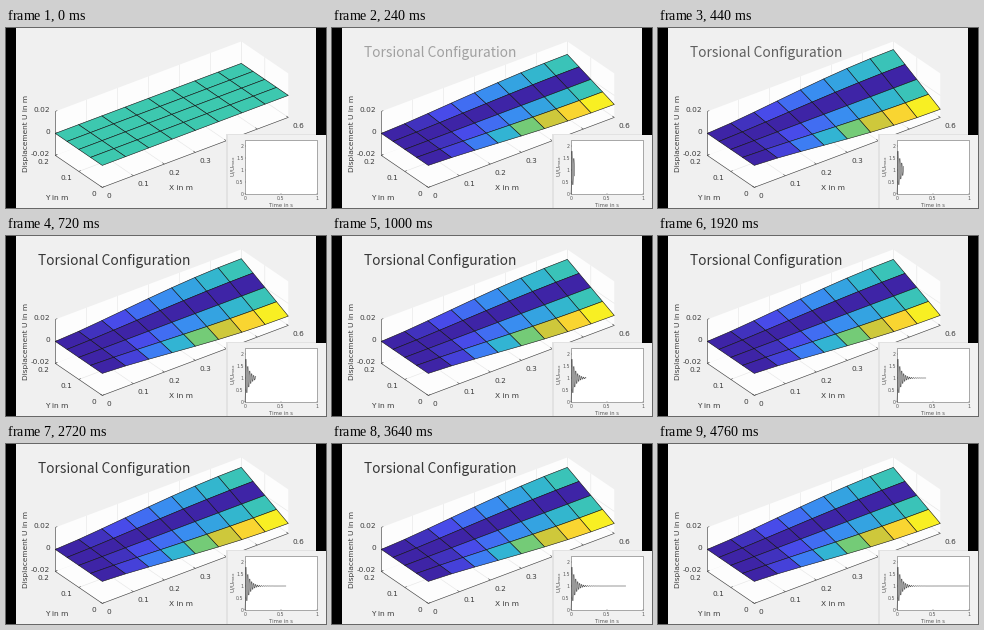
These frames come from a looping animation (320 by 180 pixels, 4.8 s). A matplotlib script:

```python
import numpy as np
import matplotlib.pyplot as plt
from matplotlib.animation import FuncAnimation
from matplotlib.collections import LineCollection, PolyCollection
from matplotlib.colors import LinearSegmentedColormap
from matplotlib.patches import Polygon, Rectangle

W, H, DPI = 320, 180, 100
FRAMES, INTERVAL = 120, 40
PT = 72 / DPI
NX, NY = 8, 4
INK = "#3c3c3c"
PALE_INK = "#5a5a5a"
GREY = "#f0f0f0"
GRID = "#e6e6e6"

# Oblique projection: pixel vectors of the three axes
ORIGIN = np.array([96.3, 137.4])
X_VEC = np.array([186, -70])
Y_VEC = np.array([-47, -32])
Z_VEC = np.array([0, -22])
TWIST = 12 / 22

FREQ, DECAY = 36.8, 18
FADE = 14

cmap = LinearSegmentedColormap.from_list("surface", [
    (0, (0.242, 0.140, 0.650)), (1 / 7, (0.285, 0.310, 0.940)),
    (2 / 7, (0.230, 0.530, 0.955)), (3 / 7, (0.190, 0.690, 0.850)),
    (1 / 2, (0.235, 0.784, 0.690)), (4 / 7, (0.350, 0.800, 0.570)),
    (5 / 7, (0.690, 0.785, 0.240)), (6 / 7, (0.980, 0.780, 0.220)),
    (1, (0.970, 0.970, 0.120))])

plt.rcParams["font.family"] = "DejaVu Sans"
fig = plt.figure(figsize=(W / DPI, H / DPI), dpi=DPI, facecolor=GREY)
ax = fig.add_axes([0, 0, 1, 1])
ax.set_xlim(0, W)
ax.set_ylim(H, 0)
ax.axis("off")


def project(x, y, z):
    """Map x, y in 0..1 and z in -1..1 to stage pixels."""
    return ORIGIN + x * X_VEC + y * Y_VEC + z * Z_VEC


def box(x, y, w, h, color, z):
    ax.add_patch(Rectangle((x, y), w, h, fc=color, ec="none", zorder=z))


def lines(segments, color, px, z):
    ax.add_collection(LineCollection(segments, colors=color,
                                     linewidths=px * PT, zorder=z))


def label(x, y, text, px, z=6, ha="center", color=INK, **kw):
    return ax.text(x, y, text, fontsize=px * PT, ha=ha,
                   va=kw.pop("va", "center_baseline"), color=color,
                   zorder=z, **kw)


def draw_box():
    walls = [
        [(0, 1, -1), (1, 1, -1), (1, 1, 1), (0, 1, 1)],
        [(1, 0, -1), (1, 1, -1), (1, 1, 1), (1, 0, 1)],
        [(0, 0, -1), (1, 0, -1), (1, 1, -1), (0, 1, -1)],
    ]
    for wall in walls:
        ax.add_patch(Polygon([project(*p) for p in wall], fc="#fdfdfd",
                             ec="none", zorder=1))
    grid = []
    for x in np.arange(1, 7) / 6:
        grid.append([project(x, 0, -1), project(x, 1, -1), project(x, 1, 1)])
    grid.append([project(0, 0.5, -1), project(1, 0.5, -1),
                 project(1, 0.5, 1)])
    grid.append([project(0, 1, 0), project(1, 1, 0), project(1, 0, 0)])
    lines(grid, GRID, 0.6, 2)
    lines([[project(0, 1, 1), project(0, 1, -1), project(0, 0, -1),
            project(1, 0, -1)]], INK, 0.6, 3)

    for i in range(7):
        x, y = project(i / 6, 0, -1)
        lines([[(x, y), (x - 2, y - 1.4)]], INK, 0.5, 3)
        label(x + 4, y + 8, f"{i / 10:g}", 7.4, ha="left")
    for i in range(3):
        x, y = project(0, i / 2, -1)
        lines([[(x, y), (x + 2, y - 0.8)]], INK, 0.5, 3)
        label(x - 6, y + 6.5, f"{i / 10:g}", 7.4, ha="right")
        x, y = project(0, 1, i - 1)
        lines([[(x, y), (x + 2, y - 0.8)]], INK, 0.5, 3)
        label(x - 5, y - 2.2, f"{(i - 1) / 50:g}", 7.4, ha="right")
    label(175, 159, "X in m", 7.5)
    label(51, 169, "Y in m", 7.5)
    label(20, 105, "Displacement U in m", 7.4, rotation=90, va="center")


def plot_x(t):
    return 239 + 71.5 * t


def plot_y(u):
    return 166 - 24 * u


def draw_inset():
    box(220, 106, 90, 74, "#e2e2e2", 8)
    box(222, 107, 98, 73, "#f1f1f1", 8)
    ax.add_patch(Rectangle((239, 112), 71.5, 54, fc="white", ec=PALE_INK,
                           lw=0.5 * PT, zorder=9))
    for t in (0, 0.5, 1):
        x = plot_x(t)
        lines([[(x, 166), (x, 165)]], PALE_INK, 0.4, 9)
        label(x, 170.5, f"{t:g}", 4.8, 9, color=PALE_INK)
    for u in np.arange(5) / 2:
        y = plot_y(u)
        lines([[(239, y), (240, y)]], PALE_INK, 0.4, 9)
        label(237.5, y, f"{u:g}", 4.8, 9, ha="right", color=PALE_INK)
    label(275, 177, "Time in s", 5.3, 9, color=PALE_INK)
    label(227.5, 138, r"U/U$_\mathrm{max}$", 6, 9, color=PALE_INK,
          rotation=90, va="center")


def response(t):
    return 1 - np.exp(-DECAY * t) * np.cos(2 * np.pi * FREQ * t)


def mode(i):
    """Twist along the plate, from the clamp (0) to the free end (1)."""
    return np.sin(np.pi / 2 * i / NX) ** 1.4


def height(i, j, u):
    return u * TWIST * mode(i) * (2 * j / NY - 1)


# Far cells first, so nearer ones overlap them
CELLS = [(i, j) for j in reversed(range(NY)) for i in reversed(range(NX))]


def cell_corners(i, j, u):
    ring = [(i, j), (i + 1, j), (i + 1, j + 1), (i, j + 1)]
    return [project(a / NX, b / NY, height(a, b, u)) for a, b in ring]


def cell_colors(u):
    if abs(u) < 1e-6:
        return [cmap(0.5)]
    return [cmap(abs(height(i, j, 1)) / TWIST) for i, j in CELLS]


def title_alpha(n):
    return float(np.clip(min(n, FRAMES - 1 - n) / FADE, 0, 1))


draw_box()
draw_inset()
box(0, 0, 10, H, "black", 7)
box(310, 0, 10, H, "black", 7)

plate = PolyCollection([cell_corners(i, j, 0) for i, j in CELLS],
                       edgecolors="#101010", linewidths=0.55 * PT, zorder=5)
ax.add_collection(plate)
curve, = ax.plot([], [], color="#202020", lw=0.45 * PT, zorder=10)
title = ax.text(31.6, 29.3, "Torsional Configuration", fontsize=13.8 * PT,
                family="Noto Sans CJK JP", color="#383838", va="baseline",
                zorder=6)


def update(n):
    now = n / (FRAMES - 1)
    u = response(now)
    plate.set_verts([cell_corners(i, j, u) for i, j in CELLS])
    plate.set_facecolor(cell_colors(u))
    t = np.linspace(0, now, 1 + 10 * n)
    curve.set_data(plot_x(t), plot_y(response(t)))
    title.set_alpha(title_alpha(n))
    return plate, curve, title


anim = FuncAnimation(fig, update, frames=FRAMES, interval=INTERVAL,
                     init_func=lambda: update(0), repeat=True,
                     repeat_delay=0)
plt.show()
```
